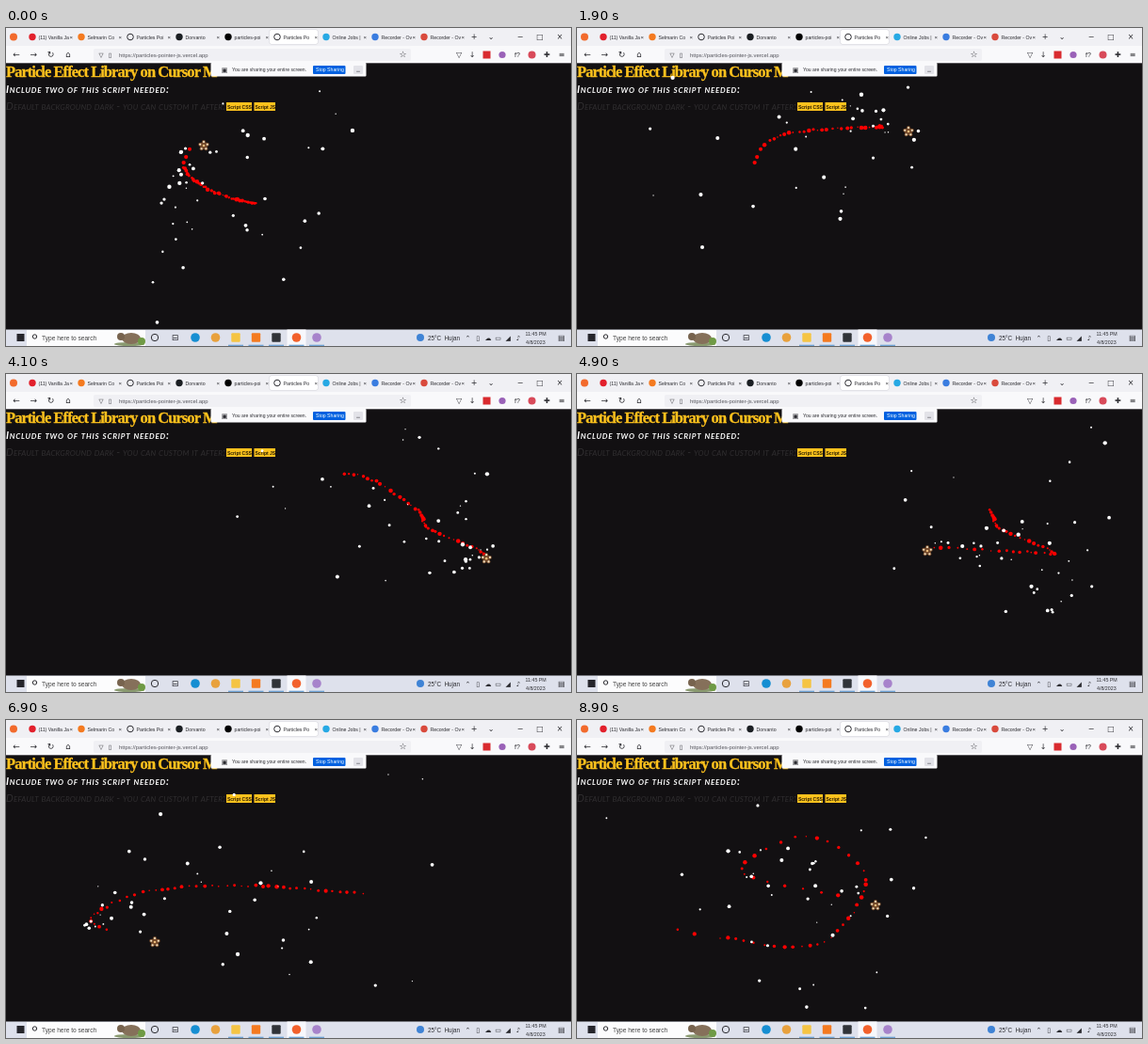
An HTML page that plays this animation: 600x338 px, repeating every 9 s.

```html
<!DOCTYPE html>
<html lang="en">
<head>
<meta charset="utf-8">
<title>Particle trail</title>
<style>
  html, body { margin: 0; width: 100%; height: 100%; overflow: hidden; background: #121012; }
  svg { display: block; width: 600px; height: 338px; }
  text { font-family: "Liberation Sans", "DejaVu Sans", sans-serif; white-space: pre; }
  .title { font: bold 16.5px "Liberation Serif", serif; letter-spacing: -.95px; fill: #ffc21d; stroke: #ffc21d; stroke-width: .3; }
  .hand { font: italic bold small-caps 11px Lato, sans-serif; letter-spacing: .75px; fill: #fff; }
  .dim { font-weight: normal; letter-spacing: .15px; fill: #302e30; }
  .code { font-weight: bold; }
  .glyph { font-family: "DejaVu Sans", sans-serif; text-anchor: middle; }
</style>
</head>
<body>
<svg id="stage" viewBox="0 0 600 338"></svg>
<script>
const LOOP = 9000, STEP = 100, LIFE = 2100, LAG = 70, GAP = 45, START = -2100;
const INK = "#2b2b30", YELLOW = "#ffc21d";

// pointer path: time, x, y
const path = [
  [START, 265, 187], [-900, 218, 173], [-200, 189, 148], [0, 204, 120],
  [400, 245, 109], [1100, 317, 105], [1800, 322, 105], [1900, 346, 105],
  [2300, 388, 112], [2800, 437, 145], [3300, 449, 164], [3900, 505, 189],
  [4200, 488, 190], [4900, 366, 183], [5600, 250, 176], [6200, 150, 182],
  [6600, 92, 208], [6800, 104, 221], [6900, 152, 231], [7400, 257, 238],
  [7900, 306, 168], [8200, 245, 123], [8500, 176, 162], [8900, 311, 192]
];

const rand = (n, k) => {
  const v = Math.sin(n * 12.9898 + k * 78.233) * 43758.5453;
  return v - Math.floor(v);
};

// Catmull-Rom curve through the path points
function pointer(t) {
  const last = path.length - 1;
  let i = 0;
  while (i < last - 1 && path[i + 1][0] <= t) i++;
  const p = k => path[Math.max(0, Math.min(last, k))];
  const a = p(i - 1), b = p(i), c = p(i + 1), d = p(i + 2);
  const u = Math.max(0, Math.min(1, (t - b[0]) / (c[0] - b[0])));
  return [1, 2].map(k => b[k] + u / 2 * (c[k] - a[k]
    + u * (2 * a[k] - 5 * b[k] + 4 * c[k] - d[k]
    + u * (3 * (b[k] - c[k]) + d[k] - a[k]))));
}

// markup helpers
const rect = (x, y, w, h, fill, r = 0) =>
  `<rect x="${x}" y="${y}" width="${w}" height="${h}" rx="${r}" fill="${fill}"/>`;
const disc = (x, y, r, fill) => `<circle cx="${x}" cy="${y}" r="${r}" fill="${fill}"/>`;
const ring = (x, y, r) =>
  `<circle cx="${x}" cy="${y}" r="${r}" fill="none" stroke="${INK}" stroke-width="1"/>`;
const text = (s, x, y, size, fill = INK, cls = "") =>
  `<text class="${cls}" x="${x}" y="${y}" fill="${fill}" ${size ? `font-size="${size}"` : ""}>${s}</text>`;
const glyphs = (list, x, pitch, y, size) =>
  [...list].map((g, i) => text(g, x + i * pitch, y, size, INK, "glyph")).join("");

function page() {
  return rect(0, 0, 600, 338, "#121012")
    + text("Particle Effect Library on Cursor M", 0, 51.7, 0, YELLOW, "title")
    + text("Include two of this script needed:", 0, 68.5, 0, "", "hand")
    + text("Default background dark - you can custom it after:", 0, 87, 0, "", "hand dim")
    + rect(234, 79, 27, 9, YELLOW) + text("Script CSS", 235, 85.5, 5, "#221a00", "code")
    + rect(263.5, 79, 22.5, 9, YELLOW) + text("Script JS", 264.5, 85.5, 5, "#221a00", "code");
}

function sprite() {
  let s = disc(0, 0, 4, "#6d4427");
  for (let i = 0; i < 5; i++) {
    const a = (i * .4 - .5) * Math.PI, x = 4 * Math.cos(a), y = 4 * Math.sin(a);
    s += disc(x, y, 1.9, "#7d5332") + disc(x, y, 1.1, "#f3e3c4");
  }
  return s + disc(0, 0, 1.3, "#e8b878");
}

function browser() {
  const tabs = [
    ["(11) Vanilla Ja", "#e2202c"], ["Selmarin Co", "#f47a20"], ["Particles Poi"],
    ["Dorvanto", "#1b1f23"], ["particles-poi", "#000"], ["Particles Po"],
    ["Online Jobs |", "#27a9e4"], ["Recorder - Ov", "#3a7de0"], ["Recorder - Ov", "#d94a3d"]
  ];
  return rect(0, 0, 600, 19, "#f0f0f4") + rect(0, 19, 600, 18.3, "#f9f9fb")
    + rect(279.5, 1.5, 52, 16, "#d8d8de", 2) + rect(280, 2, 51, 15, "#fff", 2)
    + disc(8, 9.5, 4, "#f26a2c")
    + tabs.map(([name, color], i) => {
      const x = 28 + i * 52;
      return (color ? disc(x, 9.5, 3.7, color) : ring(x, 9.5, 3.3))
        + text(name, x + 6.5, 11.5, 5.2) + text("×", x + 39.5, 11.7, 6);
    }).join("")
    + glyphs("+⌄", 497, 18, 12, 8) + glyphs("−□×", 546, 21, 12.3, 8)
    + rect(93, 22, 337, 13, "#f0f0f4", 2)
    + glyphs("←→↻⌂", 11, 18.3, 31.3, 9) + glyphs("▽▯", 101, 9.5, 30.8, 6.5)
    + text("https://particles-pointer-js.vercel.app", 120, 30.6, 5.9, "#55555c")
    + glyphs("☆", 421.5, 0, 31.3, 9)
    + glyphs("▽↓", 481, 14, 31.3, 8) + rect(506.5, 24.5, 8, 8, "#d92b2f")
    + disc(527, 28.5, 3.6, "#9a62b8") + text("f?", 540, 31, 7, INK)
    + disc(558.5, 28.5, 4, "#d84a5a") + glyphs("✚≡", 574.5, 15.7, 31.3, 8);
}

function notice() {
  return rect(217.5, 37, 165, 14.5, "#f9f9fb", 1)
    + glyphs("▣", 232, 0, 46.8, 7)
    + text("You are sharing your entire screen.", 240, 46.3, 5.1)
    + rect(326, 40, 34.5, 9, "#0061e0", 1) + text("Stop Sharing", 329, 46.3, 5.2, "#fff")
    + rect(369, 40, 10, 9, "#e2e2e8", 1) + glyphs("−", 374, 0, 48, 6);
}

function taskbar() {
  const apps = ["#168ed2", "#e8a13d", "#f5c443", "#f47a20", "#303338", "#f2612c", "#a783cb"];
  const pitch = 21.5, first = 201;
  return rect(0, 320.5, 600, 17.5, "#dee1ec")
    + rect(11.5, 325, 8, 8, "#26262c") + rect(22, 321, 126, 17, "#fcfcfd")
    + ring(30.5, 328, 2.2) + text("Type here to search", 38, 331.8, 6.6, "#444")
    + `<ellipse cx="131" cy="336" rx="16" ry="2" fill="#8a9a70"/>
       <ellipse cx="133" cy="330" rx="10" ry="6" fill="#85705a"/>`
    + disc(122, 328, 4, "#77634e") + disc(144, 333, 4, "#6f9a45")
    + ring(158, 329, 3.7) + glyphs("⊟", 179.5, 0, 332.3, 9)
    + rect(first + 5 * pitch - 10, 320.5, 20, 17.5, "#f7f8fc")
    + apps.map((color, i) => {
      const x = first + i * pitch, square = i > 1 && i < 5;
      return (square ? rect(x - 4.7, 324.3, 9.4, 9.4, color, 1) : disc(x, 329, 4.8, color))
        + (i > 1 ? rect(x - 8, 336.7, 16, 1.3, "#6fa3d4") : "");
    }).join("")
    + disc(440, 329, 4, "#3f83d5") + text("25°C  Hujan", 448, 331.5, 6.3)
    + glyphs("⌃▯☁▭◢♪", 490.5, 10.7, 331.8, 7)
    + text("11:45 PM", 551.5, 327.3, 5.3) + text("4/8/2023", 552, 336, 5.3)
    + glyphs("▤", 590, 0, 332, 8);
}

const $ = id => document.getElementById(id);
$("stage").innerHTML = page() + `<g id="dots"></g><g id="cursor">${sprite()}</g>`
  + browser() + notice() + taskbar();

// one resting red dot and one flying white dot per pointer move
const dots = [];
for (let t = START, n = 1; t < LOOP; t += GAP, n++) {
  const [x, y] = pointer(t), [px, py] = pointer(t - GAP);
  if (t > START && Math.hypot(x - px, y - py) < .3) continue;
  const add = (fill, k, speed, r) => dots.push({
    t, fill, r,
    x: x + rand(n, k) * 2 - 1, y: y + rand(n, k + 1) * 2 - 1,
    vx: (rand(n, k + 2) * 2 - 1) * speed, vy: (rand(n, k + 3) * 2 - 1) * speed
  });
  add("#f00", 1, 0, .7 + 1.6 * rand(n, 9));
  add("#fff", 5, .063, .6 + 1.6 * rand(n, 10));
}

function draw(t) {
  $("dots").innerHTML = dots.map(d => {
    const age = t - d.t;
    return age < LAG || age > LIFE ? "" : disc(d.x + d.vx * age, d.y + d.vy * age, d.r, d.fill);
  }).join("");
  const [x, y] = pointer(t);
  $("cursor").setAttribute("transform", `translate(${x + 6} ${y + 5})`);
}

const begin = performance.now();
function tick() {
  const t = (performance.now() - begin) % LOOP;
  draw(Math.floor(t / STEP) * STEP);
  requestAnimationFrame(tick);
}
tick();
</script>
</body>
</html>
```
